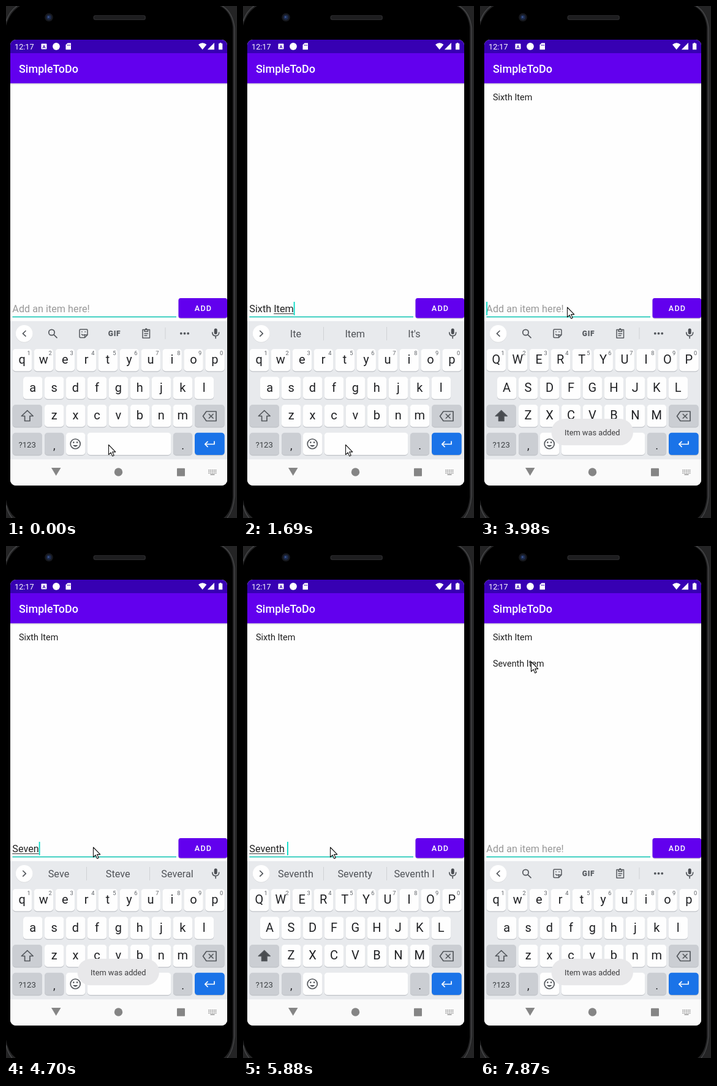
Recreate the animation shown at these times as an HTML page. Size 377 by 836 pixels, loop 7.99 s.

```html
<!DOCTYPE html>
<html lang="en">
<head>
<meta charset="utf-8">
<title>To-do list</title>
<style>
html, body { margin: 0; width: 100%; height: 100%; overflow: hidden; background: #000; }
svg { display: block; width: 377px; height: 836px; font-family: Roboto, sans-serif; }
text { white-space: pre; }
.mid { text-anchor: middle; }
.icon { fill: none; stroke: #54585d; stroke-width: 1.7; stroke-linejoin: round; stroke-linecap: round; }
</style>
</head>
<body>
<svg id="stage" viewBox="0 0 377 836"></svg>
<script>
const LOOP = 7990;
const HINT = 'Add an item here!';

// time, text, start of the underlined word, suggestions, capitals, caret
const typing = [
  [0, '', 0, '', 0, 0],
  [120, 'S', 0, '', 0, 1],
  [270, 'Si', 0, 'So,See,Sir', 0, 1],
  [390, 'Six', 0, 'Si,Six,Sit', 0, 1],
  [540, 'Sixt', 0, 'Six,Sixth,Sixty', 0, 1],
  [660, 'Sixth', 0, 'Sixt,Sixth,Sixty', 0, 1],
  [810, 'Sixth', 0, 'Sixth,Sixty,Sixths', 0, 1],
  [1330, 'Sixth ', 0, 'Sixth,Sixty,Sixth I', 1, 1],
  [1450, 'Sixth I', 6, 'I,I\'m,It', 0, 1],
  [1570, 'Sixth Ite', 6, 'It,It\'s,Its', 0, 1],
  [1690, 'Sixth Item', 6, 'Ite,Item,It\'s', 0, 1],
  [1840, 'Sixth Item', 6, 'Item,Items,Itemized', 0, 1],
  [2260, 'Sixth Item', 6, 'Item,Items,Itemized', 0, 0],
  [2650, '', 0, '', 0, 1],
  [3190, '', 0, '', 0, 0],
  [3610, '', 0, '', 0, 1],
  [3980, '', 0, '', 1, 1],
  [4130, 'S', 0, '', 0, 1],
  [4280, 'Se', 0, 'So,See,Sir', 0, 1],
  [4420, 'Sev', 0, 'Se,See,Set', 0, 1],
  [4560, 'Seve', 0, 'Sev,Seven,Several', 0, 1],
  [4700, 'Seven', 0, 'Seve,Steve,Several', 0, 1],
  [4820, 'Seven', 0, 'Seven,Sevens,Seventh', 0, 1],
  [5090, 'Sevent', 0, 'Seven,Sevens,Seventh', 0, 1],
  [5210, 'Seventh', 0, 'Sevent,Seventh,Seventy', 0, 1],
  [5360, 'Seventh', 0, 'Seventh,Seventy,Sevenths', 0, 1],
  [5600, 'Seventh ', 0, 'Seventh,Seventy,Seventh I', 0, 1],
  [5880, 'Seventh ', 0, 'Seventh,Seventy,Seventh I', 1, 1],
  [6000, 'Seventh I', 8, 'I,I\'m,It', 0, 1],
  [6140, 'Seventh It', 8, 'It,It\'s,Its', 0, 1],
  [6270, 'Seventh Ite', 8, 'It,It\'s,Its', 0, 1],
  [6410, 'Seventh Item', 8, 'Ite,Item,It\'s', 0, 1],
  [6540, 'Seventh Item', 8, 'Item,Items,Itemized', 0, 1],
  [6930, 'Seventh Item', 8, 'Item,Items,Itemized', 0, 0],
  [7200, '', 0, '', 0, 1],
  [7730, '', 0, '', 0, 0]
];

// start, end, target x, target y
const moves = [
  [1840, 2260, 305, 485],
  [2530, 2800, 195.5, 519],
  [2930, 3310, 142.5, 492],
  [6410, 6810, 304.5, 485],
  [7330, 7870, 83.5, 189]
];

// time, radius, opacity
const ripple = [
  [0, 0, 0], [2380, 14, .2], [2500, 37, .2], [2650, 90, .1], [2800, 90, .04], [2930, 0, 0],
  [6930, 14, .2], [7080, 37, .2], [7200, 90, .1], [7330, 0, 0]
];

const toast = [
  [0, 0], [2650, .25], [2800, .65], [2930, 1], [4820, .5], [4970, 0],
  [7330, .3], [7450, .7], [7600, 1]
];

const rect = (x, y, w, h, fill, r = 0, more = '') =>
  `<rect x="${x}" y="${y}" width="${w}" height="${h}" rx="${r}" fill="${fill}" ${more}/>`;
const text = (x, y, size, fill, str, more = '') =>
  `<text x="${x}" y="${y}" font-size="${size}" fill="${fill}" ${more}>${str}</text>`;
const circle = (x, y, r, fill, more = '') =>
  `<circle cx="${x}" cy="${y}" r="${r}" fill="${fill}" ${more}/>`;
const path = (d, more = '') => `<path d="${d}" ${more}/>`;
const group = (id, body, more = '') => `<g id="${id}" ${more}>${body}</g>`;

const key = (x, y, w, fill = '#fefefe') =>
  rect(x, y + 1, w, 36.5, '#bfc2c7', 5) + rect(x, y, w, 36.3, fill, 5);

function phone() {
  return rect(0, 0, 377, 836, '#000') +
    path('M0 0H23Q7 9 0 32Z M377 0H349Q367 9 370 34V802Q368 826 355 836H377Z M0 806Q3 826 16 836H0Z', 'fill="#242425"') +
    path('M0 25Q6 8 18 0M353 0Q370 10 373 36V800Q371 824 361 836M0 815Q3 828 10 836', 'fill="none" stroke="#48494b" stroke-width="1.3"') +
    circle(70, 18.5, 6.8, '#17191f') + circle(70, 18.5, 4, '#1d2b4c') + circle(69.4, 18, 1.6, '#3a5590') +
    rect(142.5, 15, 85.5, 8, '#29292b', 3.5) + rect(144, 16, 82.5, 5.5, '#1d1d1f', 2.5);
}

function statusBar() {
  return rect(7, 55, 354, 22, '#3700b3') +
    text(14, 70.7, 12.7, '#fff', '12:17') +
    rect(57.5, 61.5, 9, 9, '#fff', 1) + text(62, 69, 7.5, '#3700b3', 'A', 'class="mid" font-weight="700"') +
    circle(82, 66, 5.9, '#fff') +
    path('M100.5 60.5H106V71.3H97.5V63.5Z', 'fill="#fff"') +
    path('M100.5 63v2M102.4 63v2M104.3 63v2', 'stroke="#3700b3" stroke-width=".9"') +
    path('M314 63Q320.700 57.500 327.400 63L320.700 71.200Z', 'fill="#fff"') +
    path('M340 60V71.2H328.800Z', 'fill="#fff"') +
    path('M347 61.2H348.800V60H351.400V61.2H353.300V71.2H347Z', 'fill="#fff"');
}

function app() {
  return rect(7, 77, 354, 49.5, '#6200ee') +
    rect(7, 126.5, 354, 1, '#c9c9c9') + rect(7, 127.5, 354, 1, '#ededed') +
    text(21, 108.8, 18, '#fff', 'SimpleToDo', 'font-weight="500"') +
    text(21, 154, 14.42, '#202020', 'Sixth Item', 'id="item1"') +
    text(21, 197, 14.42, '#202020', 'Seventh Item', 'id="item2"') +
    rect(10.5, 506.8, 267.5, 1.6, '#12c5b3') +
    text(10.3, 500.3, 16.23, '#999', HINT, 'id="hint"') +
    text(10.3, 500.3, 16.23, '#212121', '', 'id="entry"') +
    rect(10, 502, 0, 1, '#333', 0, 'id="under"') +
    rect(10.3, 483, 1.8, 22, '#03dac5', 0, 'id="caret"') +
    rect(281.5, 478.5, 79.5, 32.3, '#cfcfcf', 3.5) +
    rect(281.5, 477, 79.5, 32.4, '#6200ee', 3.5) +
    text(322, 498, 12.62, '#fff', 'ADD', 'class="mid" font-weight="500" letter-spacing="1.13"') +
    circle(305, 492, 0, '#fff', 'id="ripple" clip-path="url(#button)"');
}

function toolbar() {
  return path('M32 530.500L27.500 534.800L32 539.200', 'class="icon"') +
    circle(74.5, 533, 4.700, 'none', 'class="icon"') + path('M78 536.700L83 541.600', 'class="icon" stroke-width="2"') +
    path('M121.500 528H131.500Q133 528 133 529.500V537L128.500 541.500H121.500Q120 541.500 120 540V529.500Q120 528 121.500 528ZM133 537H128.500V541.500M123.600 536Q125.500 538.600 128 536.500M123.700 532h.5M129 532h.5', 'class="icon" style="stroke-width:1.5"') +
    text(177, 538.7, 12, '#54585d', 'GIF', 'class="mid" font-weight="900" letter-spacing=".7"') +
    path('M223 528.500H234.500V542H223ZM226 528.500V531.500H231.500V528.500M226 535H231.500M226 538.300H230', 'class="icon" style="stroke-width:1.5"') +
    circle(228.7, 527.6, 1.7, '#54585d') +
    rect(259.5, 525, 1, 19, '#cfd1d5') +
    [285.8, 291.5, 297.200].map(x => circle(x, 534.700, 1.9, '#54585d')).join('');
}

function suggestions() {
  return path('M27.800 530.500L32.300 534.800L27.800 539.200', 'class="icon"') +
    [131, 234].map(x => rect(x, 524, 1, 22, '#cfd1d5')).join('') +
    [86, 182.700, 279.500].map(x => text(x, 541, 16.25, '#505358', '', 'class="mid word"')).join('');
}

function letters() {
  const rows = [['qwertyuiop', 10.7, 560, 584.2], ['asdfghjkl', 28, 605.5, 629.7], ['zxcvbnm', 63, 651, 675.2]];
  return rows.map(([row, left, top, base], r) => [...row].map((c, i) => {
    const x = left + i * 34.95;
    return key(x, top, 31.5) +
      text(x + 15.6, base, 20, '#1f2023', c, 'class="mid letter"') +
      (r ? '' : text(x + 26.4, 570, 9.3, '#5f6368', (i + 1) % 10, 'class="mid"'));
  }).join('')).join('');
}

function keyboard() {
  const gray = '#cbced3';
  return rect(7, 514.500, 354, 226, '#e8eaed') +
    circle(29.700, 535.500, 14, '#d5d7da') + circle(29.700, 534.800, 13.900, '#fff') +
    group('tools', toolbar()) + group('words', suggestions()) +
    rect(339.700, 526.500, 5, 9.500, '#4b4e53', 2.5) +
    path('M336.800 533V534Q337.500 538.600 342.200 538.600Q347 538.600 347.600 534V533M342.200 539V542.500', 'class="icon"') +
    letters() +
    key(10.7, 651, 48.300, gray) +
    path('M34.800 660.500L44.200 669.500H39V677.500H30.600V669.500H25.400Z', 'id="shift" class="icon"') +
    key(308, 651, 48.700, gray) +
    path('M327 662H343V677.500H327L321.500 669.700ZM331.300 666.500L338 673M338 666.500L331.300 673', 'class="icon"') +
    key(10.7, 696.800, 48.300, gray) + text(34.700, 720.500, 13.200, '#3c4043', '?123', 'class="mid"') +
    key(63, 696.800, 31.500, gray) + text(78.800, 723.500, 18, '#202124', ',', 'class="mid"') +
    key(97.900, 696.800, 31.500) + circle(113.200, 715, 8, 'none', 'class="icon"') +
    path('M109 717Q113.200 722.600 117.400 717Z', 'fill="#54585d"') +
    circle(110.300, 712.600, 1.3, '#54585d') + circle(116.100, 712.600, 1.3, '#54585d') +
    key(132.800, 696.800, 136.500) +
    key(272.900, 696.800, 31.200, gray) + text(288.500, 723.500, 18, '#202124', '.', 'class="mid"') +
    key(308, 696.800, 48.700, '#1a73e8') +
    path('M340 711V715.500H325M329 711.300L324.700 715.500L329 719.700', 'class="icon" style="stroke:#fff"');
}

function navBar() {
  const gray = '#858585';
  const dots = [0, 1, 2].map(r => [0, 1, 2, 3, 4].map(c =>
    rect(330.500 + c * 2.8, 757 + r * 2.5, 1.6, 1.4, gray)).join('')).join('');
  return rect(7, 740.500, 354, 43, '#fafafa') +
    path('M74 754H89.500L81.700 767Z', `fill="${gray}"`) +
    circle(183.500, 761, 6.700, gray) + rect(279, 754.700, 13, 13, gray, .8) +
    dots + rect(333.500, 764.500, 7, 1.3, gray);
}

const stage = document.getElementById('stage');
stage.innerHTML =
  `<defs><clipPath id="screen">${rect(7, 55, 354, 728, '#000', 9)}</clipPath>` +
  `<clipPath id="button">${rect(281.5, 477, 79.5, 32.4, '#000', 3.5)}</clipPath></defs>` +
  phone() +
  group('view', rect(7, 55, 354, 728, '#fefefe') + statusBar() + app() + keyboard() + navBar(), 'clip-path="url(#screen)"') +
  group('toast', rect(116.500, 674, 133.500, 43.300, '#e8e8ea', 21.6) +
    text(183.300, 700.500, 12.800, '#3e3e40', 'Item was added', 'class="mid"')) +
  group('pointer', path('M0 0V16L3.700 12.600L6.200 18.400L8.700 17.300L6.200 11.600H11.300Z',
    'fill="#fff" stroke="#111" stroke-width="1.1" stroke-linejoin="round"'));

const $ = id => document.getElementById(id);
const set = (id, attrs) => { for (const k in attrs) $(id).setAttribute(k, attrs[k]); };
const show = (id, on) => { $(id).style.display = on ? '' : 'none'; };
const at = (table, t) => table.filter(row => row[0] <= t).pop();
const words = document.querySelectorAll('.word');
const keys = document.querySelectorAll('.letter');

const pen = document.createElement('canvas').getContext('2d');
const width = str => {
  pen.font = '16.23px Roboto, sans-serif';
  return pen.measureText(str).width;
};

function pointerAt(t) {
  let x = 167.500, y = 716.500;
  for (const [start, end, tx, ty] of moves) {
    if (t < start) break;
    const n = Math.round((end - start) / 133);
    const p = Math.min(1, Math.floor((t - start) / (end - start) * n + .001) / n);
    const e = p * p * (3 - 2 * p);
    x += (tx - x) * e;
    y += (ty - y) * e;
  }
  return [x, y];
}

function draw(t) {
  const [, str, from, sug, caps, caret] = at(typing, t);
  const left = width(str.slice(0, from));
  $('entry').textContent = str;
  show('hint', !str);
  set('under', { x: 10.3 + left, width: width(str.trim()) - left });
  show('caret', caret);
  set('caret', { x: 10.3 + width(str) });
  show('tools', !sug);
  show('words', sug);
  sug.split(',').forEach((w, i) => { words[i].textContent = w; });
  keys.forEach(k => {
    k.textContent = caps ? k.textContent.toUpperCase() : k.textContent.toLowerCase();
  });
  $('shift').style.fill = caps ? '#494c50' : 'none';
  show('item1', t >= 2650);
  show('item2', t >= 7200);
  const [, r, alpha] = at(ripple, t);
  set('ripple', { r, opacity: alpha });
  set('toast', { opacity: at(toast, t)[1] });
  set('pointer', { transform: `translate(${pointerAt(t)})` });
}

const begin = performance.now();
function tick() {
  draw((performance.now() - begin) % LOOP);
  requestAnimationFrame(tick);
}
tick();
</script>
</body>
</html>
```
